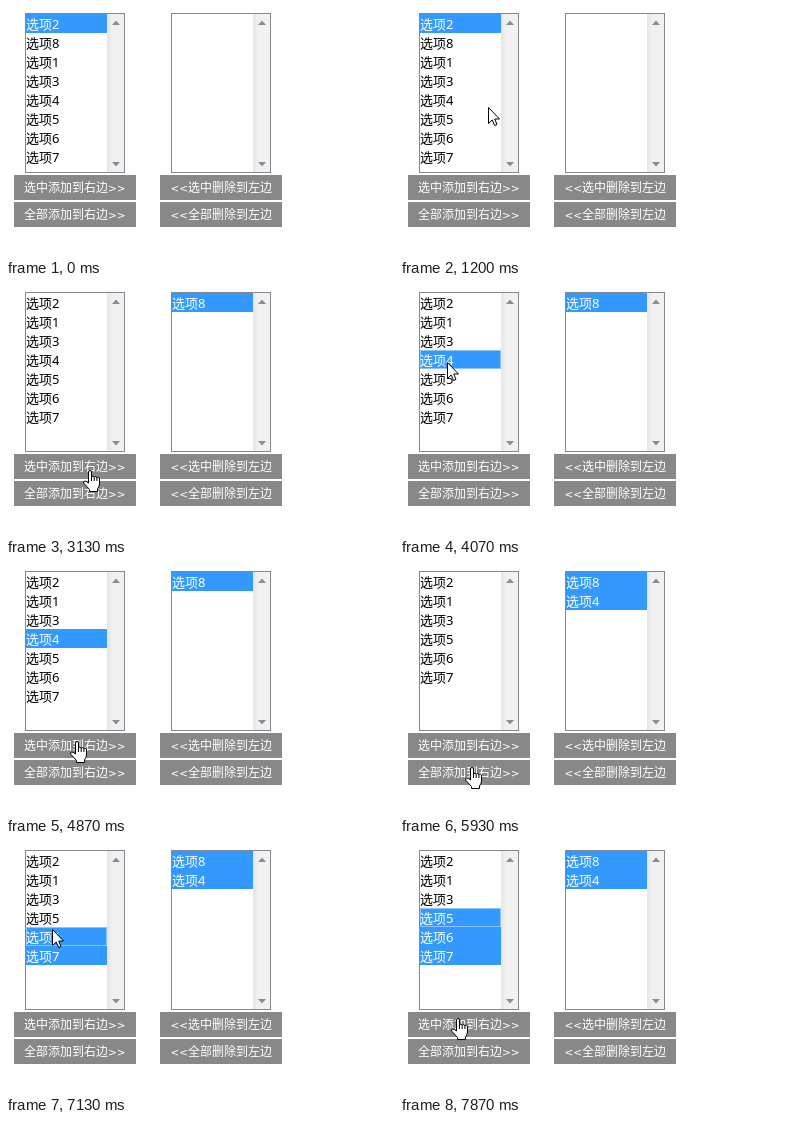
An HTML page with a canvas for the animation above (8 s loop, 388 px wide and 251 px high).

```html
<!DOCTYPE html>
<html lang="zh-CN">
<head>
<meta charset="utf-8">
<style>
  html, body { margin: 0; width: 100%; height: 100%; overflow: hidden; background: #fff; }
  canvas { display: block; }
</style>
</head>
<body>
<canvas id="stage" width="388" height="251"></canvas>
<script>
const ctx = document.getElementById('stage').getContext('2d');
const LOOP = 8000, TICK = 1000 / 15, ROW = 19;
const CJK = '"Noto Sans", "Noto Sans CJK SC", "Noto Sans CJK", sans-serif';

// Pointer moves: first tick, last tick, end position
const moves = [
  [8, 8, 211, 240], [9, 11, 127, 166], [15, 22, 49, 35],
  [34, 34, 55, 60], [35, 37, 83, 185], [56, 59, 47, 77],
  [64, 71, 70, 177], [82, 85, 71, 204], [89, 89, 71, 203],
  [90, 93, 47, 111], [100, 102, 46, 93], [107, 107, 46, 86],
  [108, 109, 43, 74], [114, 118, 57, 175]
];

// List states: start tick, left items, right items, selected on the left, focused item
const states = [
  [0, '28134567', '', '2', ''],
  [24, '28134567', '', '8', '8'],
  [45, '28134567', '', '8', ''],
  [47, '2134567', '8', '', ''],
  [61, '2134567', '8', '4', '4'],
  [73, '2134567', '8', '4', ''],
  [76, '213567', '84', '', ''],
  [95, '213567', '84', '7', '7'],
  [103, '213567', '84', '67', '6'],
  [110, '213567', '84', '567', '5']
];

const buttons = [
  [8, 169, '选中添加到右边', '>>'], [154, 169, '选中删除到左边', '<<'],
  [8, 196, '全部添加到右边', '>>'], [154, 196, '全部删除到左边', '<<']
];
const BUTTON_W = 122, BUTTON_H = 25;

const arrowShape = new Path2D('M.5.5V16.5L4.2 13 6.6 18.5 9 17.5 6.7 12H11.5Z');
const handShape = new Path2D('M5.5 13V2a1.5 1.5 0 0 1 3 0V7a1.4 1.4 0 0 1 2.7.5a1.4 1.4 0 0 1 2.7.5' +
  'a1.4 1.4 0 0 1 2.6 1V14Q16.5 16 14.5 19V21.5H6.5V19.5L1 13.5Q0 11.5 1.5 11 3 10.8 5.5 13Z' +
  'M8.5 7v4M11.2 7.5V11M13.9 8V11');

function rect(color, x, y, w, h) {
  ctx.fillStyle = color;
  ctx.fillRect(x, y, w, h);
}

function text(str, x, y, color, font) {
  ctx.font = font;
  ctx.fillStyle = color;
  ctx.fillText(str, x, y);
}

function triangle(x, base, tip) {
  ctx.fillStyle = '#8c8c8c';
  ctx.beginPath();
  ctx.moveTo(x - 4, base);
  ctx.lineTo(x + 4, base);
  ctx.lineTo(x, tip);
  ctx.fill();
}

function drawList(x, items, selected, focused) {
  rect('#828790', x, 7, 100, 160);
  rect('#fff', x + 1, 8, 98, 158);
  const track = ctx.createLinearGradient(x + 82, 0, x + 99, 0);
  track.addColorStop(0, '#e5e5e5');
  track.addColorStop(0.3, '#f0f0f0');
  track.addColorStop(1, '#f1f1f1');
  rect(track, x + 82, 8, 17, 158);
  triangle(x + 91, 19, 14.5);
  triangle(x + 91, 156, 160.5);

  [...items].forEach((item, i) => {
    const y = 8 + i * ROW, on = selected.includes(item);
    if (on) rect('#39f', x + 1, y, 81, ROW);
    if (item === focused) {
      ctx.strokeStyle = '#e4efff';
      ctx.setLineDash([1, 1]);
      ctx.strokeRect(x + 1.5, y + 0.5, 80, ROW - 1);
      ctx.setLineDash([]);
    }
    text('选项' + item, x + 1, y + 15, on ? '#fff' : '#000', '13px ' + CJK);
  });
}

function drawButton([x, y, label, marks]) {
  rect('#888', x, y, BUTTON_W, BUTTON_H);
  const before = marks === '<<';
  text(label, x + (before ? 28 : 10), y + 17, '#fff', '12px ' + CJK);
  text(marks, x + (before ? 10.5 : 94), y + 16.5, '#fff', '10.5px "DejaVu Sans", sans-serif');
}

function pointerAt(tick) {
  let x = 0, y = 0;
  for (const [first, last, endX, endY] of moves) {
    if (tick < first) break;
    const p = Math.min(1, (tick - first + 1) / (last - first + 1));
    const eased = p * p * (3 - 2 * p);
    x += (endX - x) * eased;
    y += (endY - y) * eased;
  }
  return [Math.round(x), Math.round(y)];
}

function drawPointer(x, y) {
  const overButton = buttons.some(([bx, by]) =>
    x >= bx && x < bx + BUTTON_W && y >= by && y < by + BUTTON_H);
  const shape = overButton ? handShape : arrowShape;
  ctx.save();
  ctx.translate(overButton ? x - 6 : x, y);
  ctx.fillStyle = '#fff';
  ctx.strokeStyle = '#000';
  ctx.fill(shape);
  ctx.stroke(shape);
  ctx.restore();
}

function draw(ms) {
  // Ticks start on whole hundredths of a second
  const tick = Math.floor((Math.floor(ms / 10) * 10 + 5) / TICK);
  const [, left, right, selected, focused] = states.filter(s => s[0] <= tick).pop();
  rect('#fff', 0, 0, 388, 251);
  drawList(19, left, selected, focused);
  drawList(165, right, right, '');
  buttons.forEach(drawButton);
  if (tick >= moves[0][0]) drawPointer(...pointerAt(tick));
}

const start = performance.now();
function frame() {
  draw((performance.now() - start) % LOOP);
  requestAnimationFrame(frame);
}
frame();
</script>
</body>
</html>
```
